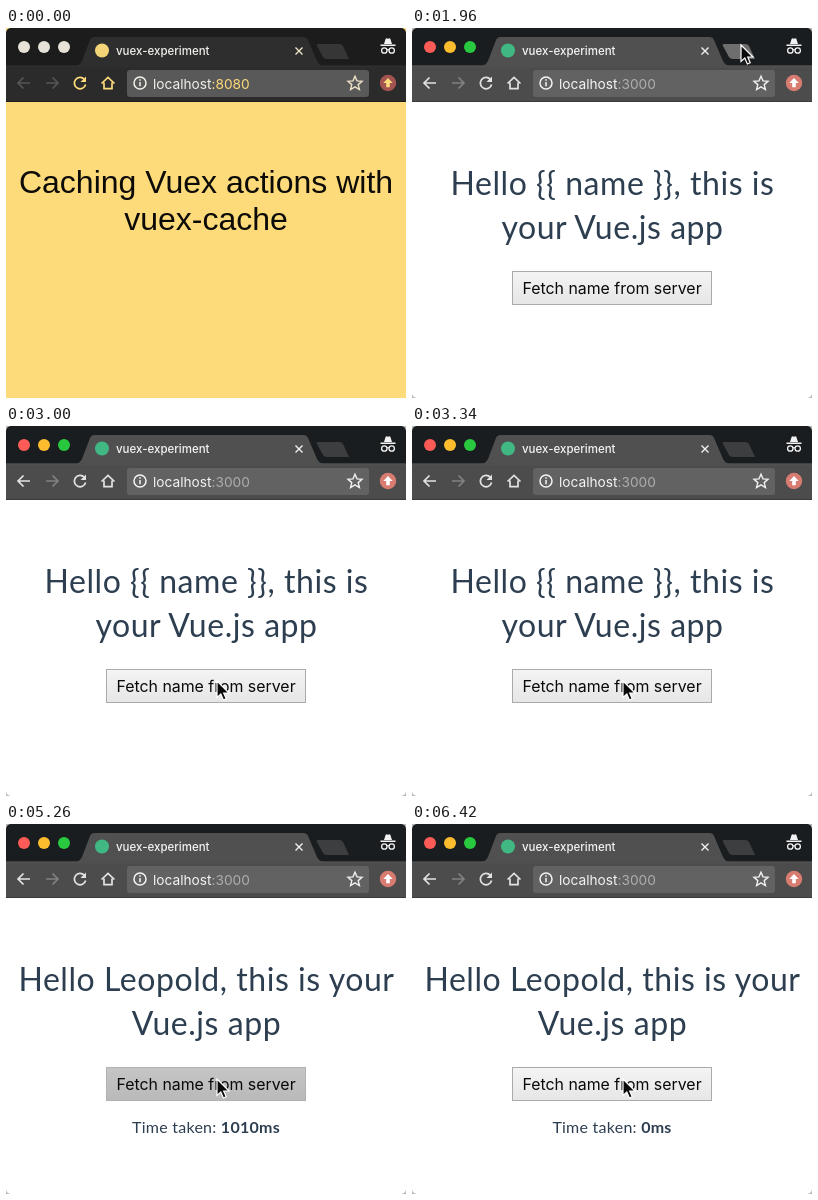
Animation, 400 px wide and 370 px high, one loop 6.48 s. Source, as an HTML page:

```html
<!DOCTYPE html>
<html lang="en">
<head>
<meta charset="utf-8">
<title>vuex-experiment</title>
<style>
  html, body { margin: 0; width: 100%; height: 100%; overflow: hidden; }
  svg { display: block; width: 400px; height: 370px; animation-name: theme; }
  svg, .t {
    animation-duration: 6480ms;
    animation-timing-function: step-end;
    animation-iteration-count: infinite;
  }

  @keyframes theme {
    0% {
      --edge: #fddb7a; --page: #fddb7a; --strip: #1c1c1c; --tab: #2e2e2e; --bar: #2b2b2b;
      --field: #595959; --line: #1d1d1d; --ink: #f2f0ea; --icon: #fddb7a; --star: #ece2c6;
      --back: #555; --forward: #555; --port: #fddb7a; --logo: #f3d476;
      --red: #e6e2d8; --amber: #e6e2d8; --green: #e6e2d8; --badge: #a35350; --arrow: #fddb7a;
    }
    30.247%, 100% {
      --edge: #b8b8b8; --page: #fff; --strip: #1a1d1f; --tab: #505050; --bar: #4c4c4c;
      --field: #626262; --line: #3a3a3a; --ink: #f4f4f4; --icon: #e2e2e2; --star: #f0f0f0;
      --back: #e2e2e2; --forward: #818181; --port: #adadad; --logo: #41b883;
      --red: #fc5b57; --amber: #fdbc2e; --green: #28c83f; --badge: #d87c72; --arrow: #fff;
    }
  }

  .window { clip-path: inset(0 round 5px); }
  .ui { font-family: Inter, Roboto, sans-serif; fill: var(--ink); }
  .url { font-size: 13.7px; }
  .url tspan { fill: var(--port); }
  .stroke { fill: none; stroke-width: 1.7; }
  .mid { text-anchor: middle; }
  .title { font: 32px "Liberation Sans", Arial, sans-serif; fill: #0c0b08; }
  .copy { font-family: Lato, sans-serif; fill: #2c3e50; }
  .big { font-size: 32px; letter-spacing: .55px; }
  .small { font-size: 16px; letter-spacing: .25px; }
  .small tspan { font-weight: 700; }

  .intro { animation-name: intro; }
  .app { animation-name: app; }
  .newtab { animation-name: newtab; }
  .before { animation-name: before; }
  .after { animation-name: after; }
  .slow { animation-name: slow; }
  .fast { animation-name: fast; }
  .pressed { animation-name: pressed; }
  .cursor { animation-name: move; }

  @keyframes intro { 0% { opacity: 1 } 30.247%, 100% { opacity: 0 } }
  @keyframes app { 0% { opacity: 0 } 30.247%, 100% { opacity: 1 } }
  @keyframes newtab { 0% { fill: #363636 } 30.247% { fill: #6e6e6e } 40.212%, 100% { fill: #3d3e3f } }
  @keyframes before { 0% { opacity: 1 } 63.272%, 100% { opacity: 0 } }
  @keyframes after { 0% { opacity: 0 } 63.272%, 100% { opacity: 1 } }
  @keyframes slow { 0% { opacity: 1 } 83.025%, 100% { opacity: 0 } }
  @keyframes fast { 0% { opacity: 0 } 83.025%, 100% { opacity: 1 } }
  @keyframes pressed {
    0%, 51.543%, 83.025%, 100% { opacity: 0 }
    49.074%, 81.173% { opacity: 1 }
  }
  @keyframes move {
    0% { transform: translate(329px, 17px) }
    39.198% { transform: translate(324px, 27px) }
    40.212% { transform: translate(311px, 54px) }
    41.226% { transform: translate(292px, 92px) }
    42.24% { transform: translate(270px, 136px) }
    43.254% { transform: translate(248px, 180px) }
    44.268% { transform: translate(229px, 218px) }
    45.282% { transform: translate(216px, 245px) }
    46.296%, 100% { transform: translate(211px, 255px) }
  }
</style>
</head>
<body>
<svg viewBox="0 0 400 370">
  <defs>
    <linearGradient id="up" x2="0" y2="1">
      <stop stop-color="#f4f4f4"/><stop offset="1" stop-color="#e6e6e6"/>
    </linearGradient>
    <linearGradient id="down" x2="0" y2="1">
      <stop stop-color="#c5c5c5"/><stop offset="1" stop-color="#b9b9b9"/>
    </linearGradient>
    <path id="arrow" d="M13 0H1M6.5-5.5 1 0l5.5 5.5"/>
  </defs>

  <rect width="400" height="370" fill="var(--edge)"/>
  <g class="window">
    <rect width="400" height="370" fill="var(--page)"/>

    <!-- Tab strip -->
    <rect width="400" height="38" fill="var(--strip)"/>
    <circle cx="18" cy="19" r="6" fill="var(--red)"/>
    <circle cx="38" cy="19" r="6" fill="var(--amber)"/>
    <circle cx="58" cy="19" r="6" fill="var(--green)"/>
    <path d="M70 38Q74 37 76 33L84 12Q85 9 89 9H297Q301 9 302 12L311 33Q313 37 317 38Z" fill="var(--tab)"/>
    <path class="t newtab" d="M312 16H333Q336 16 337 18L343 31H321Q318 31 317 29L311 18Q310 16 312 16Z"/>
    <circle cx="96" cy="22.5" r="7" fill="var(--logo)"/>
    <text class="ui" x="110" y="27" font-size="11.5" font-weight="500">vuex-experiment</text>
    <path class="stroke" d="M289.5 19.5l7 7m0-7l-7 7" stroke="var(--star)" style="stroke-width:1.4"/>

    <!-- Private mode -->
    <g fill="#f2f2f2">
      <path d="M378 16l1.6-5q.4-1 1.5-.6l.9.4.9-.4q1.1-.4 1.5.6l1.6 5zM374.5 16.5h15v1.5h-15z"/>
      <g class="stroke" stroke="#f2f2f2" style="stroke-width:1.3">
        <circle cx="378.3" cy="22.5" r="2.7"/><circle cx="385.7" cy="22.5" r="2.7"/>
        <path d="M381 22q1-.8 2 0"/>
      </g>
    </g>

    <!-- Toolbar -->
    <rect y="37.5" width="400" height="36.5" fill="var(--bar)"/>
    <rect y="37.5" width="400" height="2" fill="var(--tab)"/>
    <rect y="73" width="400" height="1" fill="var(--line)"/>
    <g class="stroke">
      <use href="#arrow" x="11" y="55" stroke="var(--back)"/>
      <use href="#arrow" transform="translate(53 55) scale(-1 1)" stroke="var(--forward)"/>
      <g stroke="var(--icon)">
        <path d="M78.3 51.3A5.7 5.7 0 1 0 79.6 56.5"/>
        <path d="M95.5 55.5l6.5-6 6.5 6M98 54.5v6.2h8v-6.2"/>
      </g>
    </g>
    <path d="M80 48.5v5.5h-5.5z" fill="var(--icon)"/>
    <rect x="121" y="42" width="242" height="27" rx="3" fill="var(--field)"/>
    <g class="stroke" stroke="var(--ink)" style="stroke-width:1.5">
      <circle cx="134" cy="55" r="6"/>
      <path d="M134 54v4.3M134 51.2v1.6"/>
    </g>
    <text class="t ui url intro" x="147" y="60.5">localhost<tspan>:8080</tspan></text>
    <text class="t ui url app" x="147" y="60.5">localhost<tspan>:3000</tspan></text>
    <path class="stroke" d="M349 48.3l2 4.6 5 .4-3.8 3.3 1.2 4.9-4.4-2.6-4.4 2.6 1.2-4.9-3.8-3.3 5-.4z" stroke="var(--star)" style="stroke-width:1.4"/>
    <circle cx="382" cy="55" r="8.2" fill="var(--badge)"/>
    <path d="M382 50l4.7 5h-2.9v4.2h-3.6v-4.2h-2.9z" fill="var(--arrow)"/>

    <!-- Title card -->
    <g class="t intro title mid">
      <text x="200" y="165">Caching Vuex actions with</text>
      <text x="200" y="202">vuex-cache</text>
    </g>

    <!-- Demo app -->
    <g class="t app">
      <g class="copy mid">
        <g class="t before big">
          <text x="200.5" y="167">Hello {{ name }}, this is</text>
          <text x="200.5" y="211">your Vue.js app</text>
        </g>
        <g class="t after">
          <g class="big">
            <text x="200.5" y="167">Hello Leopold, this is your</text>
            <text x="200.5" y="211">Vue.js app</text>
          </g>
          <g class="small">
            <text class="t slow" x="200" y="309">Time taken: <tspan>1010ms</tspan></text>
            <text class="t fast" x="200" y="309">Time taken: <tspan>0ms</tspan></text>
          </g>
        </g>
      </g>
      <rect x="100.5" y="243.5" width="199" height="33" fill="url(#up)" stroke="#aaa"/>
      <rect class="t pressed" x="100.5" y="243.5" width="199" height="33" fill="url(#down)" stroke="#b2b2b2"/>
      <text class="mid" x="200" y="266" font-family="Inter, Roboto, sans-serif" font-size="15.9" fill="#0a0a0a">Fetch name from server</text>
      <path class="t cursor" d="M0 0V16.5L3.8 13 6.4 19 9.2 17.8 6.7 12H12Z" fill="#0a0a0a" stroke="#fff" stroke-width="1.2"/>
    </g>
  </g>
</svg>
</body>
</html>
```
